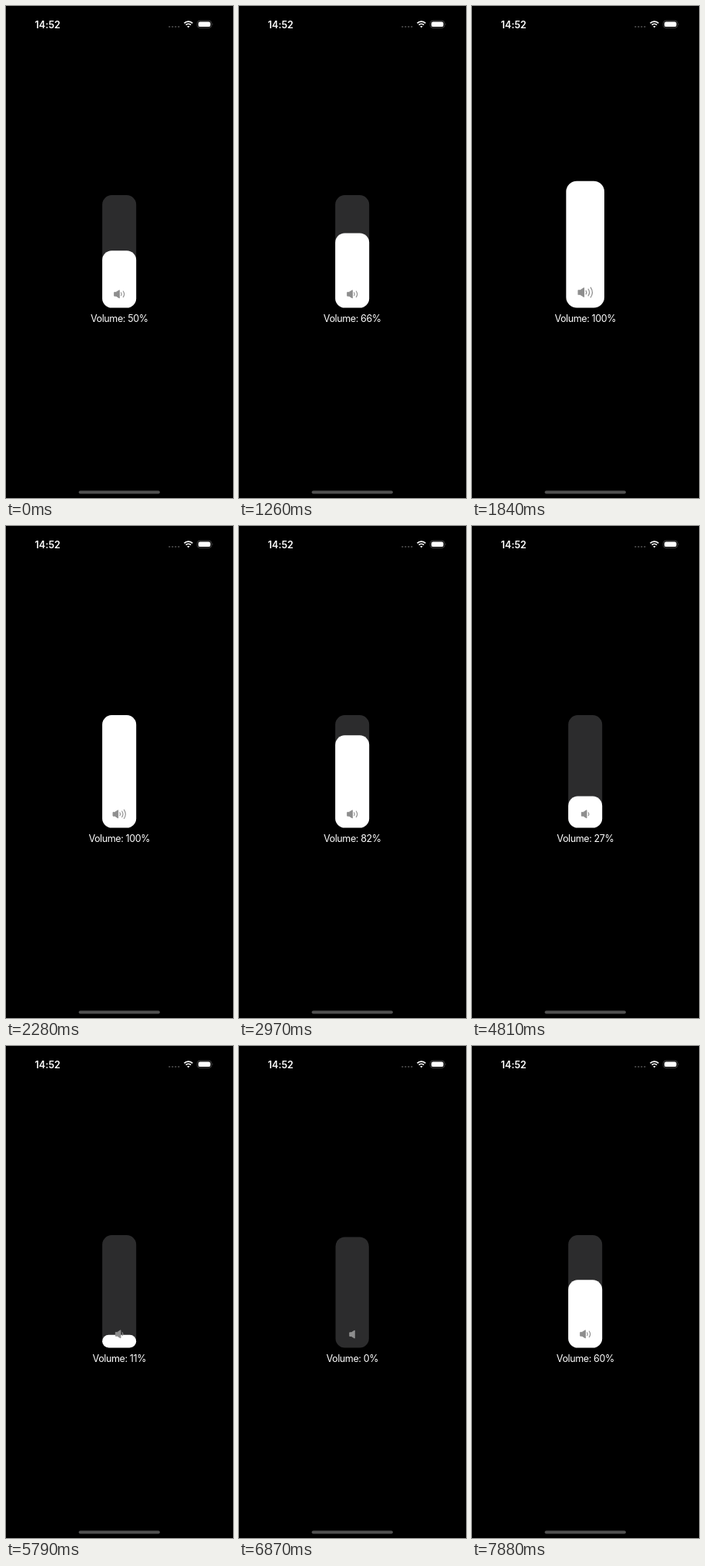
Animation, 295 px wide and 640 px high, one loop 7.99 s. Source, as an HTML page:

```html
<!DOCTYPE html>
<html lang="en">
<head>
<meta charset="utf-8">
<title>Volume slider</title>
<style>
  html, body { margin: 0; width: 100%; height: 100%; overflow: hidden; background: #000; }
  svg { display: block; width: 100%; height: 100%; }
  text { font-family: Inter, Roboto, sans-serif; fill: #fff; }
  .clock { font-size: 12.6px; font-weight: 600; letter-spacing: -.05px; }
  .label { font-size: 12.5px; letter-spacing: -.38px; text-anchor: middle; }
  .wave { fill: none; stroke: #8e8e8e; stroke-width: 1.1; stroke-linecap: round; }
</style>
</head>
<body>
<svg viewBox="0 0 295 640">
  <text class="clock" x="37.6" y="28.8">14:52</text>
  <g fill="#505050">
    <circle cx="212.4" cy="27" r="1.1"/><circle cx="216.4" cy="27" r="1.1"/>
    <circle cx="220.4" cy="27" r="1.1"/><circle cx="224.4" cy="27" r="1.1"/>
  </g>
  <g fill="none" stroke="#fff" stroke-width="1.7">
    <path d="M231.6 22.4a7.6 7.6 0 0 1 10.8 0"/>
    <path d="M233.7 24.7a4.7 4.7 0 0 1 6.6 0"/>
    <path d="M237 28.3l-1.7-1.8a2.4 2.4 0 0 1 3.4 0z" fill="#fff" stroke="none"/>
  </g>
  <rect x="248.7" y="19.2" width="18.2" height="9.2" rx="3" fill="none" stroke="#585858" stroke-width=".8"/>
  <rect x="250" y="20.5" width="15.6" height="6.6" rx="2.2" fill="#fff"/>
  <path d="M268 22.3q1.2 1.5 0 3z" fill="#585858"/>

  <g id="bar">
    <rect x="125.1" y="246.1" width="44.1" height="146.4" rx="12.3" fill="#2c2c2d"/>
    <rect id="fill" x="125.1" width="44.1" fill="#fff"/>
    <g id="icon">
      <path d="M.6-2.4H2.9L7.2-5.1V5.1L2.9 2.4H.6z" fill="#8e8e8e" stroke="#8e8e8e" stroke-width="1" stroke-linejoin="round"/>
    </g>
  </g>
  <text class="label" id="label" x="147.3" y="411"></text>
  <rect x="94.5" y="630.4" width="105.5" height="4" rx="2" fill="#515151"/>
</svg>
<script>
const LOOP = 7990, STEP = 110;
const BOTTOM = 392.5, HEIGHT = 146.4, MID = 147.1, CORNER = 12.3;
const START_LEVEL = .508;

// Finger drags: start, end, level aimed at (may lie past the ends of the bar).
const drags = [
  [990, 1110, .55], [1260, 2050, 1.45], [2170, 2280, 1], [2500, 3100, .785],
  [3240, 3930, .493], [4060, 4420, .341], [4570, 4910, .259], [5270, 5490, .176],
  [5690, 5790, .114], [6150, 6870, -.2], [6970, 7170, 0], [7530, 7880, .602]
];

// The bar swells when pulled past an end: press, release, settled.
const pulls = [[1600, 1940, 2280], [6320, 6500, 7170]];
const SWELL = .125;

const $ = id => document.getElementById(id);
const bar = $('bar'), fill = $('fill'), icon = $('icon'), label = $('label');
const clamp = v => Math.max(0, Math.min(1, v));

// Three sound waves around one centre on the speaker cone.
const waves = [3.5, 6.8, 10.1].map(r => {
  const x = 6.6 + r * Math.cos(.6), y = r * Math.sin(.6);
  const p = document.createElementNS('http://www.w3.org/2000/svg', 'path');
  p.setAttribute('class', 'wave');
  p.setAttribute('d', `M${x} ${-y}A${r} ${r} 0 0 1 ${x} ${y}`);
  return icon.appendChild(p);
});

// Level and moment of the latest screen refresh.
function follow(t) {
  let level = START_LEVEL, shown = 0;
  for (const [start, end, goal] of drags) {
    if (t < start) break;
    const n = Math.round((end - start) / STEP), gap = (end - start) / n;
    const k = Math.min(n, Math.floor((t - start + 15) / gap));
    level = clamp(level + (goal - level) * (k + 1) / (n + 1));
    shown = start + k * gap;
  }
  return { level, shown };
}

function swell(t) {
  let s = 0;
  for (const [press, release, settled] of pulls) {
    const u = clamp((t - release) / (settled - release));
    s += clamp((t - press) / 200) * Math.cos(3.4 * u) * (1 - u);
  }
  return 1 + SWELL * s;
}

function draw(time) {
  const { level, shown } = follow(time % LOOP);
  const h = level * HEIGHT;
  fill.setAttribute('y', BOTTOM - h);
  fill.setAttribute('height', h);
  fill.setAttribute('rx', Math.min(CORNER, h / 2));

  const count = level <= 0 ? 0 : level < 1 / 3 ? 1 : level < .95 ? 2 : 3;
  waves.forEach((w, i) => w.style.display = i < count ? '' : 'none');
  const width = count ? 7.4 + 3.3 * count : 8;
  icon.setAttribute('transform', `translate(${MID - width / 2} 374.8)`);

  bar.setAttribute('transform',
    `translate(${MID} ${BOTTOM}) scale(${swell(shown)}) translate(${-MID} ${-BOTTOM})`);
  label.textContent = `Volume: ${Math.floor(level * 100 + 1e-6)}%`;
}

const begin = performance.now();
function tick() {
  draw(performance.now() - begin);
  requestAnimationFrame(tick);
}
tick();
</script>
</body>
</html>
```
